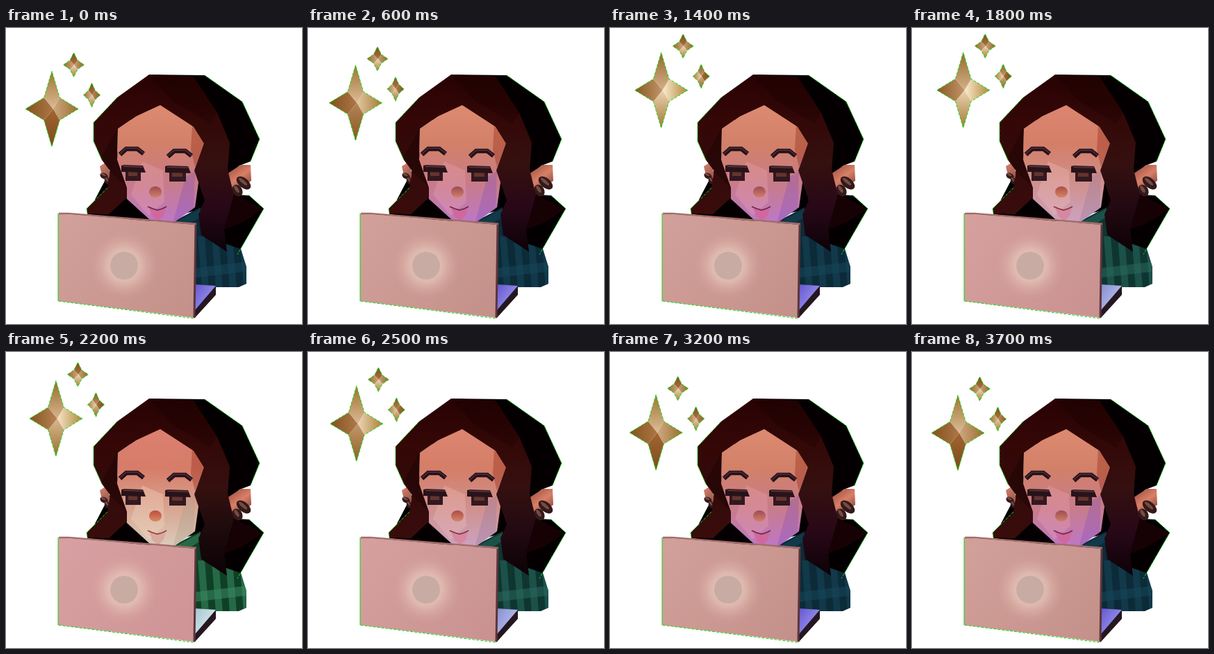
Recreate the animation shown at these times as an HTML page with a canvas. Size 426x426 px, loop 3800 ms.

```html
<!DOCTYPE html>
<html lang="en">
<head>
<meta charset="utf-8">
<title>Working at a laptop</title>
<style>
html, body { margin: 0; width: 100%; height: 100%; overflow: hidden; background: #fff; }
canvas { display: block; width: 100%; height: 100%; }
</style>
</head>
<body>
<canvas id="stage"></canvas>
<script>
const SIZE = 426, LOOP = 3800, STEP = 100;
const canvas = document.getElementById('stage');
const ctx = canvas.getContext('2d');

const clamp = v => Math.max(0, Math.min(1, v));
const wave = (t, a, b) => (1 - Math.cos(Math.PI * clamp((t - a) / (b - a)))) / 2;
const channels = hex => [1, 3, 5].map(i => parseInt(hex.slice(i, i + 2), 16));

function mix(a, b, k) {
  const to = channels(b);
  return `rgb(${channels(a).map((v, i) => Math.round(v + (to[i] - v) * k))})`;
}

function trace(pts, close) {
  ctx.beginPath();
  for (let i = 0; i < pts.length; i += 2) ctx.lineTo(pts[i], pts[i + 1]);
  if (close) ctx.closePath();
}

function poly(fill, ...pts) {
  trace(pts, true);
  ctx.fillStyle = fill;
  ctx.fill();
}

function line(color, width, ...pts) {
  trace(pts, false);
  ctx.strokeStyle = color;
  ctx.lineWidth = width;
  ctx.stroke();
}

function oval(fill, x, y, rx, ry = rx, turn = 0) {
  ctx.beginPath();
  ctx.ellipse(x, y, rx, ry, turn, 0, Math.PI * 2);
  ctx.fillStyle = fill;
  ctx.fill();
}

function fringe(...pts) {
  ctx.setLineDash([4, 2]);
  line('#14d814', 1, ...pts);
  ctx.setLineDash([]);
}

function addStops(g, stops) {
  stops.forEach((c, i) => g.addColorStop(i / (stops.length - 1), c));
  return g;
}

const linear = (x0, y0, x1, y1, ...stops) => addStops(ctx.createLinearGradient(x0, y0, x1, y1), stops);
const radial = (x, y, r, ...stops) => addStops(ctx.createRadialGradient(x, y, 0, x, y, r), stops);

// Four kite facets, each shaded by how far it faces the light.
function star(x, y, w, h, waist, light, glow) {
  const rim = [];
  for (let i = 0; i < 8; i++) {
    const a = i * Math.PI / 4, r = i % 2 ? waist : 1;
    rim.push([x + Math.cos(a) * w * r, y + Math.sin(a) * h * r]);
  }
  for (let i = 0; i < 8; i += 2) {
    const k = (1 + Math.cos(i * Math.PI / 4 - light)) / 2;
    const inner = mix('#9a5c28', '#fff0d4', clamp(k * 0.7 + glow * 0.35));
    const outer = mix('#7c4618', '#b58f40', clamp(k * 0.7 + glow * 0.25));
    const tip = rim[i];
    poly(linear(x, y, ...tip, inner, outer),
      x + w * 0.05, y, ...rim[(i + 7) % 8], ...tip, ...rim[i + 1]);
  }
  fringe(...rim.flat(), ...rim[0]);
}

function stars(p) {
  const dx = 8 * p, dy = -28 * p;
  star(66 + dx, 116.5 + dy, 38, 54.5, 0.42, 1.4 * p - 1, p);
  star(97.5 + dx, 53 + dy, 15, 17.5, 0.52, 1.6, 0.4);
  star(123.5 + dx, 96.5 + dy, 12, 17.5, 0.55, 2 + p, 0.3);
}

function shirt(g) {
  const dark = mix('#0c2a38', '#0f4027', g), light = mix('#16455a', '#3a8a62', g);
  poly(dark, 236, 281, 280, 258, 284, 300, 338, 318, 346, 344, 346, 368, 335, 373, 268, 373);
  ctx.save();
  ctx.clip();
  ctx.globalAlpha = 0.55;
  for (let i = 0; i < 4; i++) {
    const x = 276 + i * 20;
    poly(light, x, 300, x + 10, 300, x + 16, 375, x + 6, 375);
  }
  poly(light, 236, 284, 280, 260, 280, 272, 250, 290);
  poly(light, 268, 346, 350, 336, 350, 350, 268, 360);
  ctx.restore();
}

function ring(x, y, rx, ry, turn) {
  oval('#331a19', x, y, rx, ry, turn);
  oval('#754b45', x - 1, y - 2, rx * 0.65, ry * 0.35, turn);
}

function ears() {
  poly(linear(134, 194, 150, 220, '#d58672', '#8f4a40'), 135, 199, 146, 192, 152, 222, 138, 212);
  ring(141, 213, 6, 4, 0.5);
  ring(146, 220, 5, 4, 1);
  poly(linear(322, 200, 346, 232, '#a35244', '#d88068', '#8a443a'), 318, 210, 338, 197, 352, 197, 353, 220, 326, 236);
  ring(342, 223, 12, 7, 0.7);
  ring(333, 234, 9, 7, 1);
}

function hairBack() {
  poly('#040001', 206, 67, 286, 68, 340, 106, 365, 160, 352, 192, 336, 198, 320, 212,
    332, 240, 350, 241, 371, 260, 333, 326, 312, 320, 281, 298, 278, 262, 205, 279,
    117, 268, 150, 205);
}

function face(g) {
  poly(linear(215, 112, 215, 278, mix('#dc8a70', '#dc8070', g), mix('#d28068', '#d67c68', g),
    mix('#c87c88', '#d8a390', g), mix('#bd78c4', '#d9cbb8', g)),
    222, 110, 187, 127, 161, 145, 160, 190, 174, 246, 207, 276, 240, 281, 272, 258, 285, 166, 270, 142);
  poly('rgba(150,45,25,.4)', 268, 140, 286, 165, 272, 200, 266, 175);
  ctx.globalAlpha = 0.35;
  poly(mix('#8852b8', '#a9a28c', g), 272, 206, 270, 260, 240, 281, 258, 215);
  poly(mix('#e8a0b0', '#f2d6c0', g), 196, 192, 226, 205, 228, 250, 205, 270, 180, 240);
  ctx.globalAlpha = 1;
}

function brow(x, y) {
  const pts = [x, y + 8, x + 9, y, x + 25, y, x + 34, y + 7];
  line('#24111a', 6.5, ...pts);
  line('#54303a', 1.5, ...pts.map((v, i) => i % 2 ? v - 1 : v));
}

function eye(x, y, w, shut) {
  const h = 14 * (1 - shut), lid = y + 5 * shut, thick = 10 - 4 * shut;
  poly('#321820', x + 6, y + 8, x + w - 7, y + 8, x + w - 7, y + 9 + h, x + 6, y + 9 + h);
  poly('#65342f', x + 10, y + 9, x + w - 12, y + 9, x + w - 12, y + 9 + h * 0.5, x + 10, y + 9 + h * 0.5);
  poly('#28131a', x, lid + 1, x + 4, lid, x + w - 4, lid + 1, x + w, lid + thick + 1, x, lid + thick);
  line('#573136', 2, x + 3, lid + 2, x + w - 4, lid + 3);
}

function features(g, shut) {
  brow(164, 174);
  brow(233, 177);
  eye(166, 197, 35, shut);
  eye(229, 198, 37, shut);
  oval(linear(215, 228, 215, 244, mix('#9c4c50', '#c04c3c', g), mix('#d0806a', '#d48c64', g)), 215, 236, 9, 8);
  poly(mix('#d0689e', '#d9a8a0', g), 206, 259, 218, 263, 230, 259, 227, 270, 219, 278, 211, 271);
  line(mix('#6b2748', '#a03c34', g), 1.8, 204, 257, 211, 260, 218, 262, 225, 260, 231, 257);
}

function hairFront(g) {
  poly(linear(0, 67, 0, 268, '#290203', '#350707', '#320a0a', '#3a0c0c'),
    222, 111, 187, 127, 161, 145, 160, 190, 174, 230, 174, 244, 148, 268, 117, 267, 116, 260,
    146, 230, 150, 206, 138, 190, 126, 163, 126, 136, 160, 100, 206, 67, 270, 70);
  poly(linear(0, 67, 0, 322, '#260202', '#330807', '#35100f', mix('#280818', '#1c0a0c', g), '#0c0206'),
    206, 67, 270, 70, 304, 122, 322, 165, 319, 204, 328, 240, 314, 290, 318, 322,
    281, 298, 277, 268, 286, 248, 271, 205, 285, 166, 270, 142, 222, 111);
  poly('rgba(15,0,2,.3)', 160, 145, 160, 190, 174, 230, 150, 206, 138, 185);
  poly('rgba(20,0,2,.3)', 206, 67, 270, 70, 304, 122, 294, 138, 240, 105);
  poly('rgba(40,4,8,.5)', 328, 240, 371, 260, 340, 280, 314, 290);
}

function laptop(g) {
  poly('#251720', 270, 375, 302, 372, 302, 384, 271, 418);
  poly(linear(274, 370, 296, 384, mix('#6a5cd0', '#a8c8d4', g), mix('#9088ea', '#d0e2e6', g)),
    271, 369, 302, 371, 272, 406);
  const lid = [75, 267, 273, 283, 270, 417, 75, 393];
  poly(linear(75, 270, 270, 410, mix('#d2a09a', '#d8a0a2', g), mix('#c4908a', '#ce9496', g)), ...lid);
  oval(radial(170, 342, 50, 'rgba(240,224,208,.95)', 'rgba(234,205,192,.55)', 'rgba(214,164,158,0)'), 170, 342, 50);
  line('#a26c69', 2.5, 76, 267, 90, 267, 274, 282);
  line('#5c353a', 3, 273, 283, 271, 417);
  oval('#c8aca3', 170, 342, 20);
}

function edges() {
  fringe(160, 100, 126, 136, 126, 163, 138, 190);
  fringe(146, 230, 116, 260, 117, 267);
  fringe(286, 68, 340, 106, 365, 160, 352, 192);
  fringe(350, 241, 371, 260, 333, 326);
  fringe(270, 418, 75, 393);
  line('#14d814', 1, 75, 393, 75, 267);
}

function draw(t) {
  const lift = wave(t, 0, 1600) - wave(t, 1600, 3350);
  const green = wave(t, 1400, 2200) - wave(t, 2200, 2800);
  const shut = clamp(2 - Math.abs(t - 2800) / 125);
  const pw = Math.round(innerWidth * devicePixelRatio), ph = Math.round(innerHeight * devicePixelRatio);
  if (canvas.width !== pw || canvas.height !== ph) {
    canvas.width = pw;
    canvas.height = ph;
  }
  ctx.setTransform(pw / SIZE, 0, 0, ph / SIZE, 0, 0);
  ctx.fillStyle = '#fff';
  ctx.fillRect(0, 0, SIZE, SIZE);
  stars(lift);
  hairBack();
  ears();
  shirt(green);
  face(green);
  hairFront(green);
  features(green, shut);
  laptop(green);
  edges();
}

const start = performance.now();
function tick() {
  const t = (performance.now() - start) % LOOP;
  draw(Math.floor(t / STEP) * STEP);
  requestAnimationFrame(tick);
}
tick();
</script>
</body>
</html>
```
